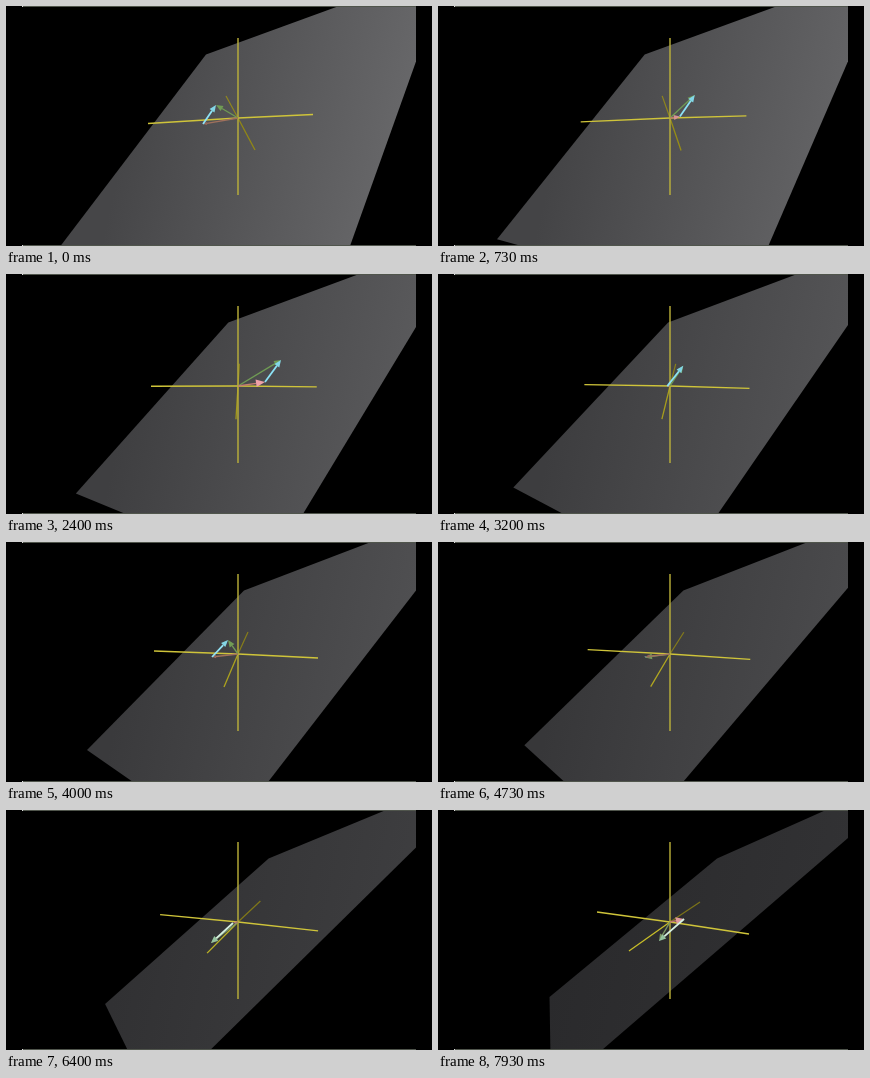
An HTML page with a canvas that plays this animation: 426 px wide and 240 px high, repeating every 8000 ms.

```html
<!DOCTYPE html>
<html lang="en">
<head>
<meta charset="utf-8">
<title>Vector sum on a turning plane</title>
<style>
  html, body { margin: 0; width: 100%; height: 100%; overflow: hidden; background: #000; }
  canvas { display: block; width: 100vw; height: 100vh; }
</style>
</head>
<body>
<canvas id="stage" width="426" height="240"></canvas>
<script>
const ctx = document.getElementById('stage').getContext('2d');
const LOOP = 8000, FPS = 15;
const MID = 4, END = 7.93;
const origin = [232, 112];

// Keys for the moving vectors: time, first vector (x, y), second vector (x, y).
const keys = [
  [0, -35, 6, 13, -19],
  [1.47, 37, -6, 16, -23],
  [2.4, 27, -4, 16, -22],
  [4, -26, 3, 16, -17],
  [5.47, -21, 2, -19, 18],
  [6.4, -5, 1, -22, 20],
  [7.93, 14, -3, -25, 22]
];

// Parabola through the start, middle and end value: the slow camera turn.
function turn(t, a, b, c) {
  return a * (t - MID) * (t - END) / (MID * END)
       + b * t * (t - END) / (MID * (MID - END))
       + c * t * (t - MID) / (END * (END - MID));
}

const turnPoint = (t, xs, ys) => [turn(t, ...xs), turn(t, ...ys)];

// Monotone cubic interpolation of one column of the keys.
function keyed(t, column) {
  const last = keys.length - 2;
  const secant = i => (keys[i + 1][column] - keys[i][column]) / (keys[i + 1][0] - keys[i][0]);
  const slope = i => {
    if (i === 0) return secant(0);
    if (i > last) return secant(last);
    const a = secant(i - 1), b = secant(i);
    return a * b <= 0 ? 0 : 2 * a * b / (a + b);
  };
  let i = 0;
  while (i < last && t > keys[i + 1][0]) i++;
  const span = keys[i + 1][0] - keys[i][0];
  const u = (t - keys[i][0]) / span, v = 1 - u;
  return v * v * (1 + 2 * u) * keys[i][column] + u * u * (3 - 2 * u) * keys[i + 1][column]
       + span * u * v * (v * slope(i) - u * slope(i + 1));
}

const mix = (from, to, k) =>
  `rgb(${from.map((c, i) => Math.round(c + (to[i] - c) * k)).join(',')})`;
const clamp = x => Math.max(0, Math.min(1, x));

function polygon(points, fill) {
  ctx.beginPath();
  points.forEach(p => ctx.lineTo(...p));
  ctx.closePath();
  ctx.fillStyle = fill;
  ctx.fill();
}

function line(from, to, color, width) {
  ctx.beginPath();
  ctx.moveTo(...from);
  ctx.lineTo(...to);
  ctx.strokeStyle = color;
  ctx.lineWidth = width;
  ctx.stroke();
}

function arrow(from, to, color, width, head, headColor = color) {
  const dx = to[0] - from[0], dy = to[1] - from[1];
  const length = Math.hypot(dx, dy) || 1;
  const size = Math.min(head, length * 0.6);
  const ux = dx / length * size, uy = dy / length * size;
  const base = [to[0] - ux, to[1] - uy];
  line(from, base, color, width);
  polygon([
    to,
    [base[0] - uy * 0.42, base[1] + ux * 0.42],
    [base[0] + uy * 0.42, base[1] - ux * 0.42]
  ], headColor);
}

function drawPlane(t) {
  const corner = turnPoint(t, [200, 238, 279], [48.5, 48.5, 48.5]);
  const low = turnPoint(t, [54.5, 81, 111.5], [240, 208, 187]);
  const angle = turn(t, 14, 34.8, 89) * Math.PI / 180;
  const bottomX = low[0] + Math.max(0, 240 - low[1]) / Math.tan(angle);
  const grey = (a, b, c) => {
    const g = Math.round(turn(t, a, b, c));
    return `rgb(${g},${g},${g + 2})`;
  };
  const shade = ctx.createLinearGradient(120, 130, 390, 190);
  shade.addColorStop(0, grey(70, 58, 42));
  shade.addColorStop(1, grey(104, 80, 50));
  polygon([
    corner, [turn(t, 333, 365, 388), 0], [410, 0],
    [410, turn(t, 55.5, 48.5, 28)], [turn(t, 344, 262, 164), 240],
    [bottomX, 240], low
  ], shade);
}

function drawAxes(t) {
  const back = turnPoint(t, [220, 242, 262], [90, 90, 92]);
  const front = turnPoint(t, [249, 218, 191], [144, 145, 141]);
  const left = turnPoint(t, [142, 148, 159], [117.5, 109, 102]);
  const right = turnPoint(t, [307, 312, 311], [108.5, 116, 124]);
  const k = t / END;
  line(origin, back, mix([146, 136, 28], [124, 116, 24], k), 1.2);
  line(origin, front, mix([146, 136, 20], [200, 190, 40], k), 1.3);
  line(left, origin, '#cfc43a', 1.3);
  line(origin, right, '#cfc43a', 1.3);
  line([232, 32], [232, 189], '#bdb23a', 1.4);
}

function drawVectors(t) {
  const first = [origin[0] + keyed(t, 1), origin[1] + keyed(t, 2)];
  const sum = [first[0] + keyed(t, 3), first[1] + keyed(t, 4)];
  const facing = clamp((first[0] - origin[0] + 20) / 40);
  const flipped = clamp((sum[1] - first[1] + 20) / 40);
  arrow(origin, sum, mix([112, 156, 84], [122, 150, 100], flipped), 1.3, 7);
  arrow(origin, first, mix([160, 112, 92], [196, 124, 116], facing), 1.4,
        4 + 5 * facing, mix([150, 104, 92], [238, 160, 168], facing));
  arrow(first, sum, mix([140, 226, 246], [214, 240, 226], flipped), 1.8,
        7, mix([130, 214, 232], [150, 196, 160], flipped));
}

function draw(t) {
  ctx.fillStyle = '#000';
  ctx.fillRect(0, 0, 426, 240);
  drawPlane(t);
  drawAxes(t);
  drawVectors(t);
  for (const y of [0, 239]) {
    ctx.fillStyle = '#50554c';
    ctx.fillRect(17, y, 393, 1);
    ctx.fillStyle = '#ddd';
    ctx.fillRect(16, y, 1, 1);
  }
}

function tick() {
  const time = performance.now() % LOOP;
  draw(Math.floor((time + 5) * FPS / 1000) % (LOOP * FPS / 1000) / FPS);
  requestAnimationFrame(tick);
}
tick();
</script>
</body>
</html>
```
